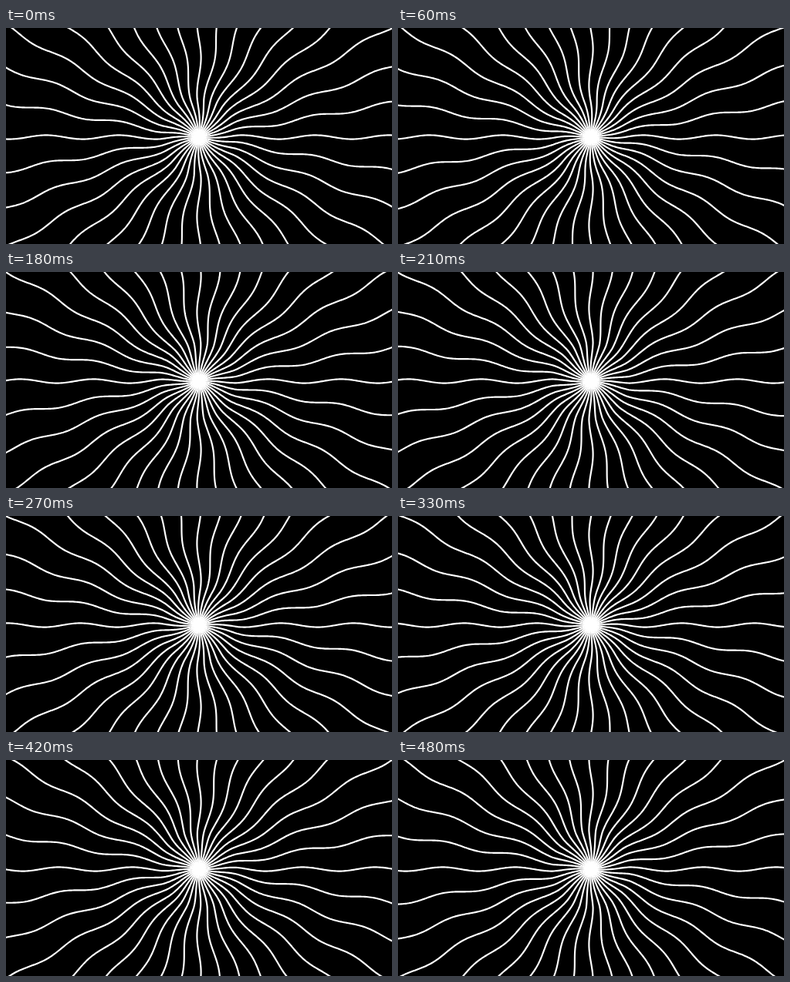
Animation of 500x281 px, one loop 0.51 s. Source, as an HTML page with a canvas:

```html
<!DOCTYPE html>
<html lang="en">
<head>
<meta charset="utf-8">
<title>Wavy rays</title>
<style>
  html, body { margin: 0; width: 100%; height: 100%; overflow: hidden; background: #000; }
  canvas { display: block; }
</style>
</head>
<body>
<canvas id="stage" width="500" height="281"></canvas>
<script>
const ctx = document.getElementById('stage').getContext('2d');
const LOOP = 510, STEP = 30;
const RAYS = 36, REACH = 310;
const AMPLITUDE = 2.6, WAVELENGTH = 94.5, CREST = 103.5, RAMP = 50;

// Sideways offset of a ray at radius r; the wave grows from the hub and travels outwards.
function sway(r, phase) {
  const growth = Math.min(1, r / RAMP);
  return AMPLITUDE * growth * Math.cos(2 * Math.PI * ((r - CREST) / WAVELENGTH - phase));
}

function draw(time) {
  const phase = Math.floor((time % LOOP) / STEP) * STEP / LOOP;
  const ray = new Path2D();
  for (let r = 0; r <= REACH; r += 2) ray.lineTo(r, sway(r, phase));

  ctx.setTransform(1, 0, 0, 1, 0, 0);
  ctx.fillStyle = '#000';
  ctx.fillRect(0, 0, 500, 281);
  ctx.translate(250, 142);
  ctx.strokeStyle = '#fff';
  ctx.lineWidth = 2.15;
  for (let i = 0; i < RAYS; i++) {
    ctx.stroke(ray);
    ctx.rotate(2 * Math.PI / RAYS);
  }
}

const start = performance.now();
function tick() {
  draw(performance.now() - start);
  requestAnimationFrame(tick);
}
tick();
</script>
</body>
</html>
```
